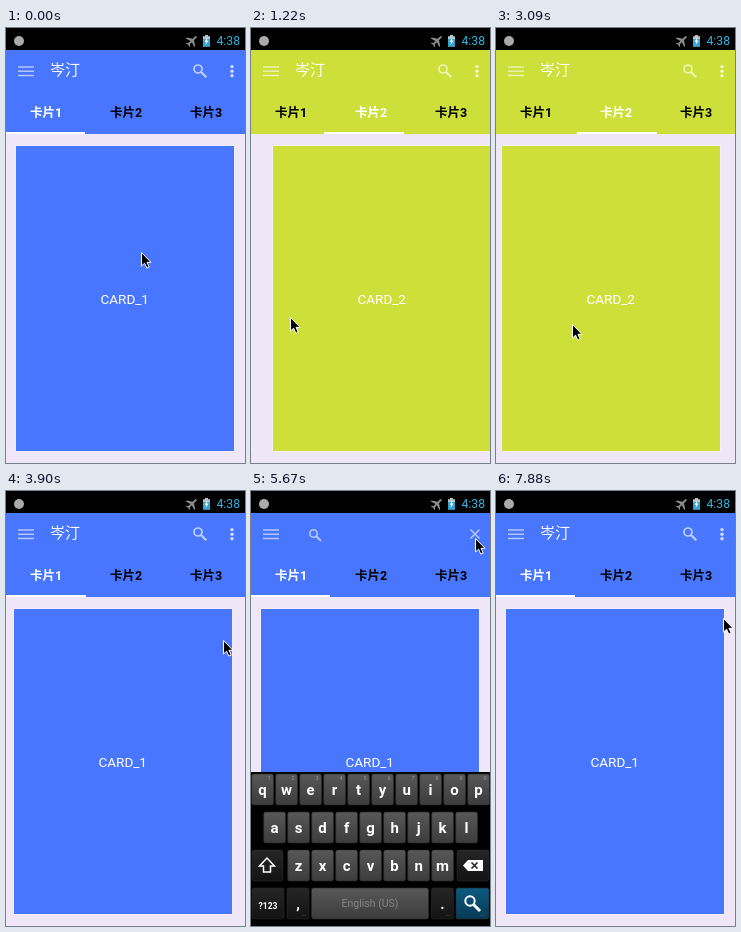
Write an HTML page that moves like this. It is 239 px wide and 435 px high and loops after 7990 ms.

```html
<!DOCTYPE html>
<html lang="zh">
<head>
<meta charset="utf-8">
<title>Card pager</title>
<style>
  html, body { margin: 0; width: 100%; height: 100%; overflow: hidden; background: #efe6f8; }
  svg { display: block; width: 100vw; height: 100vh; }
  text { font-family: Roboto, "Noto Sans CJK SC", "Noto Sans CJK", sans-serif; }
  .mid { text-anchor: middle; }
  .tab { font-size: 12.5px; font-weight: 700; }
  .card { font-size: 13.5px; fill: #fff; }
  .key { font-size: 15px; font-weight: 700; fill: #fff; }
  .hint { font-size: 5.5px; fill: #999; }
  .line { fill: none; stroke: #fff; }
</style>
</head>
<body>
<svg id="stage" viewBox="0 0 239 435" preserveAspectRatio="none">
  <defs>
    <linearGradient id="cap" x1="0" y1="0" x2="0" y2="1">
      <stop offset="0" stop-color="#585858"/><stop offset="1" stop-color="#3c3c3c"/>
    </linearGradient>
    <linearGradient id="dark" x1="0" y1="0" x2="0" y2="1">
      <stop offset="0" stop-color="#262626"/><stop offset="1" stop-color="#131313"/>
    </linearGradient>
    <linearGradient id="go" x1="0" y1="0" x2="0" y2="1">
      <stop offset="0" stop-color="#0d5a80"/><stop offset="1" stop-color="#073a55"/>
    </linearGradient>
  </defs>
  <rect width="239" height="435" fill="#efe6f8"/>
  <g id="cards"></g>
  <rect id="head" y="22" width="239" height="84"/>

  <g class="line" stroke-width="1.5" opacity=".6">
    <path d="M12 39H28M12 43.2H28M12 47.4H28"/>
  </g>
  <g id="bar">
    <text x="44" y="47.3" font-size="15" fill="#fff">岑汀</text>
    <g class="line" opacity=".65">
      <circle cx="192" cy="41" r="4" stroke-width="1.7"/>
      <path d="M195 44L200.3 49.3" stroke-width="2.1"/>
    </g>
    <g fill="#fff" opacity=".75">
      <circle cx="226" cy="38.6" r="1.7"/><circle cx="226" cy="43.2" r="1.7"/><circle cx="226" cy="47.8" r="1.7"/>
    </g>
  </g>
  <g id="find" class="line" opacity=".6">
    <circle cx="62.5" cy="42.5" r="3.7" stroke-width="1.6"/>
    <path d="M65.3 45.3L70 50" stroke-width="2"/>
    <path d="M219.5 38.5L228.5 47.5M228.5 38.5L219.5 47.5" stroke-width="1.5"/>
  </g>
  <g id="tabs"></g>
  <rect id="mark" y="104" width="80" height="2" fill="#fff"/>

  <rect width="239" height="22" fill="#000"/>
  <circle cx="13" cy="13" r="5" fill="#aaa"/>
  <path transform="translate(186 12.8) rotate(45)" fill="#8b8b8b"
    d="M0-6.5Q1-6.5 1-4.5V-1.8L6 1.5V2.8L1 1.2V4L2.6 5.3V6.2L0 5.5L-2.6 6.2V5.3L-1 4V1.2L-6 2.8V1.5L-1-1.8V-4.5Q-1-6.5 0-6.5Z"/>
  <path d="M199 7H202V8.3H204V18.5H197V8.3H199Z" fill="#b9c4c9"/>
  <rect x="197" y="11" width="7" height="7.5" fill="#33a5d5"/>
  <path d="M201.4 9.5L198.6 13.8H200.3L199.6 17L202.5 12.5H200.7Z" fill="#fff"/>
  <text x="210.5" y="17" font-size="12.2" fill="#33b5e5">4:38</text>

  <g id="menu">
    <rect x="85" y="27" width="152" height="41" rx="2" fill="#000" opacity=".14"/>
    <rect x="87" y="28" width="148" height="37" rx="1.5" fill="#fafafa"/>
    <text x="99" y="51" font-size="12" fill="#212121">Settings</text>
  </g>
  <g id="keys"></g>
  <path id="arrow" d="M.5.5V14L3.6 11.2L5.8 16.2L8.2 15.1L6 10.3H10Z" fill="#000" stroke="#fff" stroke-width="1"/>
</svg>
<script>
const LOOP = 7990, PITCH = 240, SLOP = 6, LAG = 20;
const COLORS = ['#4876ff', '#cfdf39', '#ff5722'];
const $ = id => document.getElementById(id);

function add(parent, tag, attrs, label) {
  const el = document.createElementNS('http://www.w3.org/2000/svg', tag);
  for (const k in attrs) el.setAttribute(k, attrs[k]);
  if (label !== undefined) el.textContent = label;
  return parent.appendChild(el);
}

const cards = COLORS.map((fill, i) => {
  const g = add($('cards'), 'g', {});
  add(g, 'rect', { x: 9.5, y: 117.5, width: 219, height: 306, rx: 1, fill: '#fff', opacity: .6 });
  add(g, 'rect', { x: 10, y: 118, width: 218, height: 305, fill });
  add(g, 'text', { x: 118.7, y: 276, class: 'card mid' }, 'CARD_' + (i + 1));
  return g;
});
const tabs = COLORS.map((c, i) =>
  add($('tabs'), 'text', { x: 40 + 80 * i, y: 89, class: 'tab mid' }, '卡片' + (i + 1)));

function key(x, y, w, fill, label, size = 15) {
  const board = $('keys');
  add(board, 'rect', { x, y, width: w, height: 31, rx: 2, fill, stroke: '#2a2a2a', 'stroke-width': .6 });
  if (label) add(board, 'text', { x: x + w / 2, y: y + 21, class: 'key mid', style: `font-size:${size}px` }, label);
}

function buildKeys() {
  const board = $('keys'), cap = 'url(#cap)', dark = 'url(#dark)';
  add(board, 'rect', { y: 281, width: 239, height: 154, fill: '#000' });
  [['qwertyuiop', 0], ['asdfghjkl', 12], ['zxcvbnm', 36]].forEach(([row, left], r) => {
    [...row].forEach((ch, i) => {
      const x = left + 24 * i;
      key(x + .7, 283 + 38 * r, 21.8, cap, ch);
      if (!r) add(board, 'text', { x: x + 18, y: 289, class: 'hint mid' }, (i + 1) % 10);
    });
  });
  key(1, 359, 31, dark);
  key(206, 359, 32, dark);
  key(1, 397, 32, dark, '?123', 8.5);
  key(36, 397, 22, dark, ',');
  key(60.5, 397, 117, cap);
  key(180.5, 397, 22, dark, '.');
  key(205, 397, 33, 'url(#go)');
  add(board, 'text', { x: 119, y: 416, class: 'mid', 'font-size': 10.5, fill: '#858585' }, 'English (US)');
  [53, 197, 232].forEach(x => add(board, 'text', { x, y: 425, class: 'hint mid' }, '...'));
  const pen = { class: 'line', 'stroke-width': 1.5 };
  add(board, 'path', { ...pen, d: 'M16 367L8.5 375H12.5V381H19.5V375H23.5Z' });
  add(board, 'path', { fill: '#fff', d: 'M212 374.5L217 369H232V380H217Z' });
  add(board, 'path', { d: 'M220.5 371.5L226.5 377.5M226.5 371.5L220.5 377.5', stroke: '#222', 'stroke-width': 1.6 });
  add(board, 'circle', { ...pen, cx: 219, cy: 410, r: 4.7, 'stroke-width': 2 });
  add(board, 'path', { ...pen, d: 'M222.5 413.5L229 420', 'stroke-width': 3 });
}
buildKeys();

// time, x, y
const POINTER = [
  [60, 135, 224], [280, 152, 221], [500, 169, 230], [650, 169, 230], [1093, 44, 287],
  [1220, 38, 289], [1430, 194, 295], [1460, 194, 296], [1710, 194, 296], [2068, 10, 308],
  [2110, 4, 309], [2300, 4, 309], [2500, 8, 308], [2560, 8, 308], [2905, 165, 300],
  [3090, 76, 296], [3310, 20, 300], [3370, 20, 300], [3650, 195, 190], [3900, 217, 149],
  [4000, 217, 145], [4400, 194, 31], [4600, 191, 37], [5350, 191, 37], [5670, 224, 47],
  [5850, 224, 45], [7360, 224, 45], [7720, 227, 127]
];
// page before, page after, press, release, settle length
const SWIPES = [
  [0, 1, 650, 1093, 350], [1, 2, 1710, 2068, 400],
  [2, 1, 2560, 2905, 400], [1, 0, 3370, 3650, 500]
];

const ramp = (t, a, b) => Math.min(1, Math.max(0, (t - a) / (b - a)));

function pointer(t) {
  let i = 0;
  while (i < POINTER.length - 1 && POINTER[i + 1][0] <= t) i++;
  const a = POINTER[i], b = POINTER[i + 1] || a;
  const p = a === b ? 0 : ramp(t, a[0], b[0]);
  return [a[1] + (b[1] - a[1]) * p, a[2] + (b[2] - a[2]) * p];
}

function drag(from, to, press, t) {
  const moved = Math.abs(pointer(t)[0] - pointer(press)[0]);
  return from * PITCH + (to - from) * Math.max(0, moved - SLOP);
}

function scrollAt(t) {
  const s = SWIPES.filter(s => s[2] <= t).pop();
  if (!s) return 0;
  const [from, to, press, release, span] = s;
  if (t < release) return drag(from, to, press, t);
  const end = to * PITCH;
  const rest = (1 - ramp(t, release, release + span)) ** 5;
  return end + (drag(from, to, press, release) - end) * rest;
}

function pageAt(t) {
  const s = SWIPES.filter(s => s[3] <= t).pop();
  return s ? s[1] : 0;
}

const show = (el, on) => { el.style.display = on ? '' : 'none'; };

function render(now) {
  let t = now % LOOP;
  if (t > 3660 && t < 3830) t = 3660;

  const offset = scrollAt(t), page = pageAt(t);
  cards.forEach((c, i) => c.setAttribute('transform', `translate(${Math.round(i * PITCH - offset)} 0)`));
  tabs.forEach((el, i) => el.setAttribute('fill', i === page ? '#fff' : '#000'));
  $('head').setAttribute('fill', COLORS[page]);
  $('mark').setAttribute('x', Math.round(scrollAt(t - LAG) / 3) - 1);

  const finding = t >= 4940 && t < 5910;
  show($('bar'), !finding);
  show($('find'), finding);

  const up = t < 5910 ? 1 - (1 - ramp(t, 5070, 5320)) ** 2 : 1 - ramp(t, 6010, 6240) ** 2;
  const keys = $('keys');
  show(keys, up > 0);
  keys.setAttribute('opacity', up);
  keys.setAttribute('transform', `translate(0 ${(1 - up) * 40})`);

  const open = 1 - (1 - ramp(t, 6830, 7020)) ** 2, shut = ramp(t, 7720, 7880);
  const menu = $('menu'), size = .5 + open / 2;
  show(menu, open * (1 - shut) > 0);
  menu.setAttribute('opacity', open * (1 - shut));
  menu.setAttribute('transform', `translate(235 28) scale(${size}) translate(-235 -28)`);

  const [x, y] = pointer(t).map(Math.round);
  $('arrow').setAttribute('transform', `translate(${x} ${y})`);
}

const began = performance.now();
function tick() {
  render(performance.now() - began);
  requestAnimationFrame(tick);
}
tick();
</script>
</body>
</html>
```
